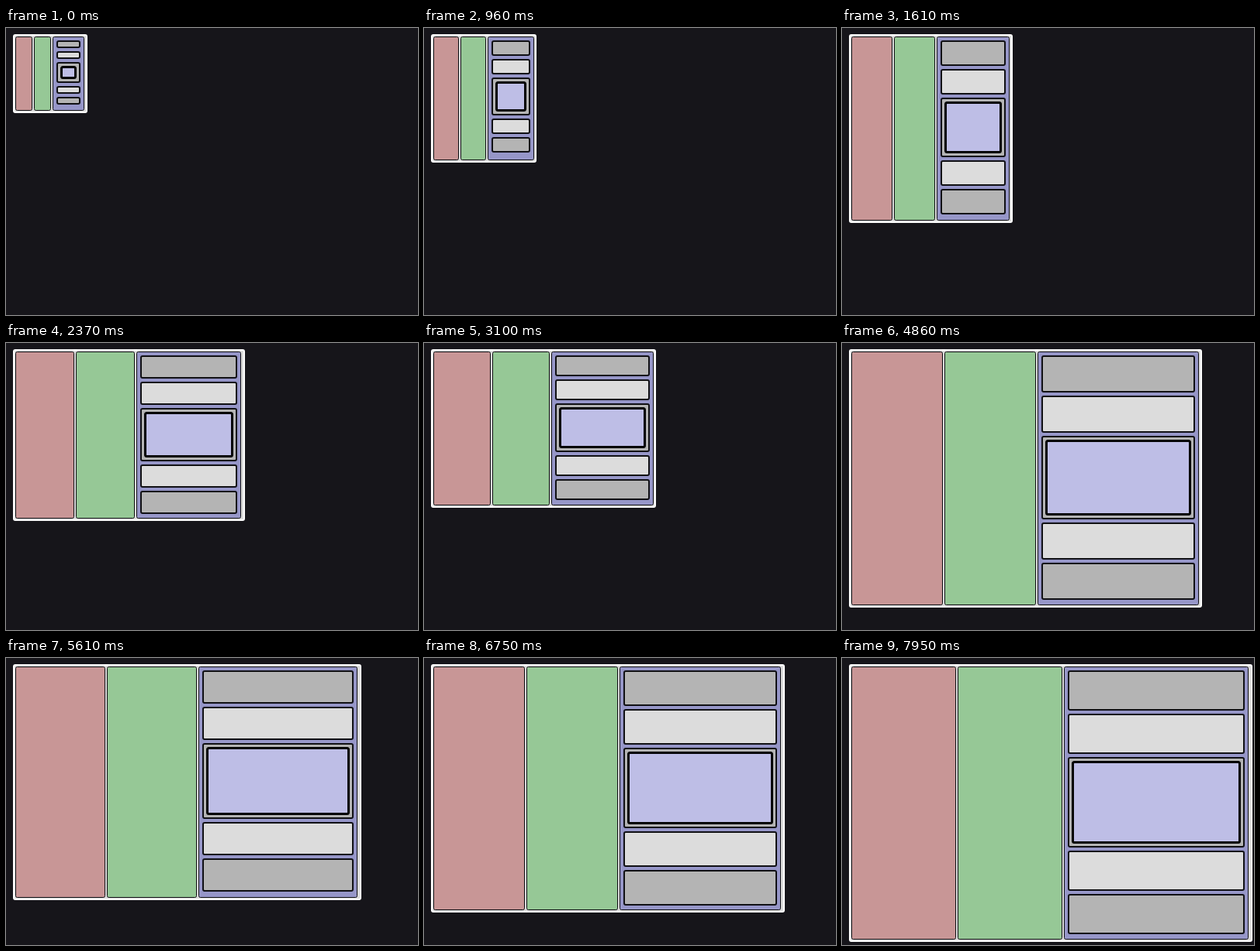
Animation, 531 px wide and 371 px high, one loop 8000 ms. Source, as an HTML page:

```html
<!DOCTYPE html>
<html lang="en">
<head>
<meta charset="utf-8">
<title>Resizing layout</title>
<style>
  html, body { margin: 0; width: 100%; height: 100%; overflow: hidden; background: #16151a; }
  svg { display: block; width: 531px; height: 371px; }
</style>
</head>
<body>
<svg id="stage" viewBox="0 0 531 371"></svg>
<script>
const LOOP = 8000;
const LEFT = 9, TOP = 8;
const LINE = "#101014";

// Turning points of the long drag: time, right edge, bottom edge
const path = [
  [340, 105, 110], [1610, 219.7, 252], [1980, 260, 259], [2760, 335, 201],
  [3100, 299.45, 213], [3620, 308, 273], [4190, 385, 337], [4450, 418, 358],
  [4860, 464, 342], [5060, 480, 325], [5450, 457, 310], [6070, 464, 329]
];

// Short pulls that follow
const pulls = [
  { from: 6720, to: 7250, by: [58, 31] },
  { from: 7620, to: 7680, by: [0, 7] },
  { from: 7860, to: 7950, by: [6.6, 0] }
];

const clamp = (v, lo, hi) => Math.min(hi, Math.max(lo, v));
const smooth = (u) => u * u * (3 - 2 * u);
const slope = (i, k) => (path[i + 1][k] - path[i][k]) / (path[i + 1][0] - path[i][0]);

// Flat at turning points, so the curve never overshoots
function tangent(i, k) {
  if (i === 0 || i === path.length - 1) return 0;
  const a = slope(i - 1, k), b = slope(i, k);
  return a * b > 0 ? 2 * a * b / (a + b) : 0;
}

function drag(time, k) {
  const t = clamp(time, path[0][0], path[path.length - 1][0]);
  let i = 0;
  while (i < path.length - 2 && t >= path[i + 1][0]) i++;
  const [p, q] = [path[i], path[i + 1]];
  const d = q[0] - p[0], u = (t - p[0]) / d, v = 1 - u;
  return p[k] * smooth(v) + q[k] * smooth(u)
    + d * u * v * (tangent(i, k) * v - tangent(i + 1, k) * u);
}

function edge(t, k) {
  return pulls.reduce(
    (sum, p) => sum + p.by[k - 1] * smooth(clamp((t - p.from) / (p.to - p.from), 0, 1)),
    drag(t, k));
}

const stage = document.getElementById("stage");

function box(fill, stroke, line) {
  const el = document.createElementNS("http://www.w3.org/2000/svg", "rect");
  const set = (o) => { for (const k in o) el.setAttribute(k, o[k]); };
  set({ fill, stroke, "stroke-width": line, rx: 2 });
  stage.append(el);
  // Edges are the outside of the border
  return (x0, y0, x1, y1) => set({
    x: x0 + line / 2, y: y0 + line / 2,
    width: Math.max(0, x1 - x0 - line), height: Math.max(0, y1 - y0 - line)
  });
}

const panel = box("#dcdcdc", "#fff", 2);
const columns = ["#c89696", "#96c896", "#9696c8"].map(c => box(c, LINE, 1));
const rows = ["#b4b4b4", "#dcdcdc", "#b4b4b4", "#dcdcdc", "#b4b4b4"].map(c => box(c, LINE, 2));
const core = box("#bebee6", "#000", 3);

function layout(right, bottom) {
  const low = Math.round(bottom);
  panel(LEFT, TOP, Math.round(right), low);

  const grow = right - 105;
  const wide = Math.round(22 + grow / 3.75);
  const last = Math.floor(41.61 + grow * 0.465);
  let x = LEFT + 3;
  columns.forEach((place, i) => {
    place(x, TOP + 3, x + (i < 2 ? wide : last), low - 3);
    if (i < 2) x += wide + 2;
  });

  const extra = low - 110;
  const small = Math.round(10.1 + extra * 0.162);
  const big = Math.floor(27.05 + extra * 0.352);
  const x0 = x + 5, x1 = x + last - 5;
  let y = TOP + 8;
  rows.forEach((place, i) => {
    const h = i === 2 ? big : small;
    place(x0, y, x1, y + h);
    if (i === 2) core(x0 + 5, y + 5, x1 - 5, y + h - 5);
    y += h + 4;
  });
}

function draw(t) {
  layout(edge(t, 1), edge(t, 2));
}

const start = performance.now();
function tick() {
  draw((performance.now() - start) % LOOP);
  requestAnimationFrame(tick);
}
draw(0);
requestAnimationFrame(tick);
</script>
</body>
</html>
```
